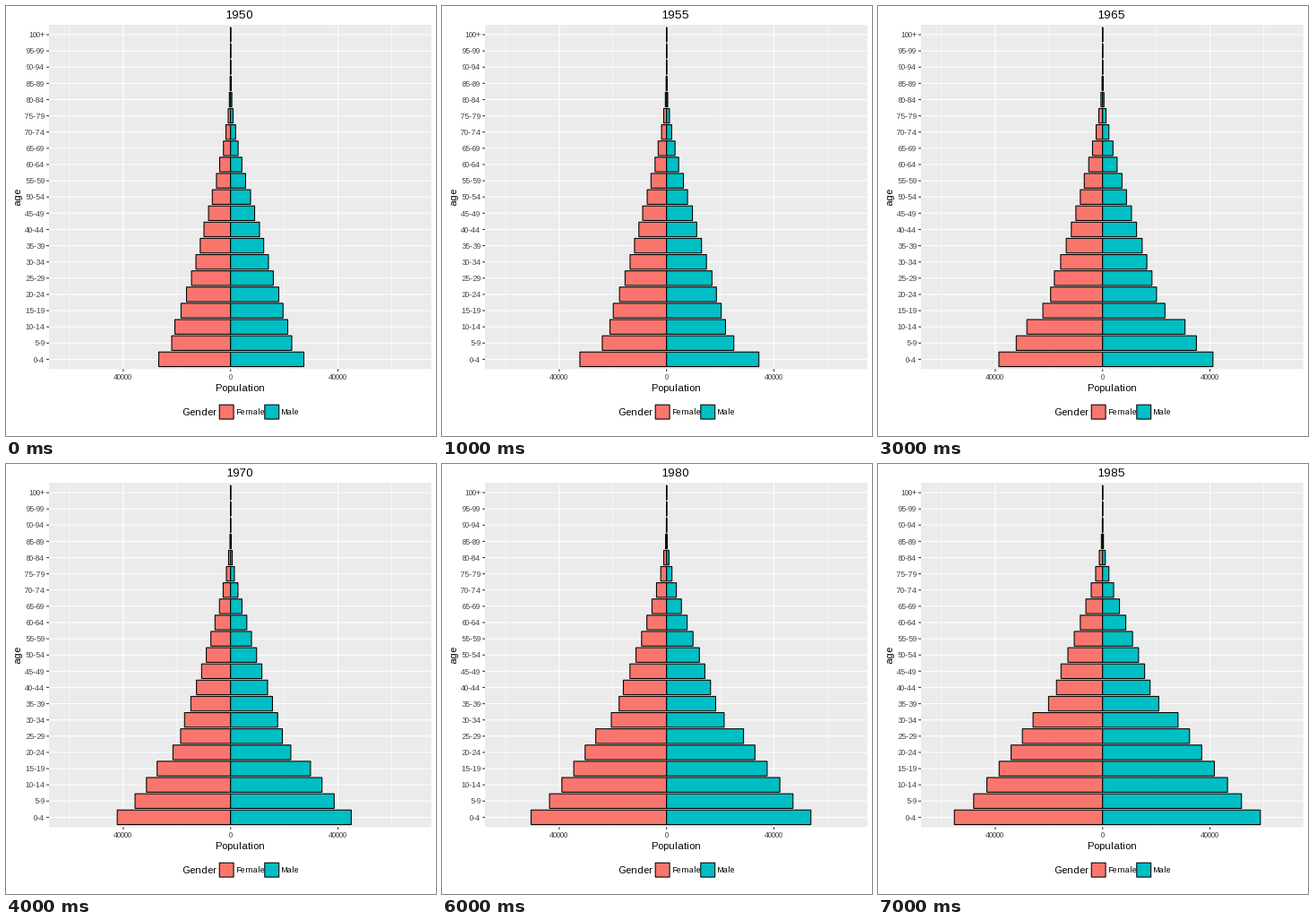
Write a matplotlib script that moves like this. It is 480 px wide and 480 px high and loops after 8000 ms.

```python
import matplotlib.pyplot as plt
import numpy as np
from matplotlib.animation import FuncAnimation
from matplotlib.patches import Rectangle

SIZE, DPI = 480, 96
PT = 72 / DPI  # points per pixel
plt.rcParams["font.family"] = "Liberation Sans"
plt.rcParams["text.hinting_factor"] = 1  # whole-pixel letter spacing
plt.rcParams["path.snap"] = False

LEFT, RIGHT, TOP, BOTTOM = 48, 474.7, 21, 405.3
MIDDLE = (LEFT + RIGHT) / 2
ZERO, STEP = 250.7, 59.9      # x of zero, pixels per 20000 people
FIRST_ROW, ROW = 394.4, 18.12
AGES = np.arange(21)          # five-year age groups
STEPS = 8                     # five-year steps from 1950
PINK, TEAL = "#F8766D", "#00BFC4"

# Bar lengths in pixels for 1950 at a few ages
KEY_AGES = [0, 1, 2, 4, 6, 8, 10, 12, 14, 16, 20]
FEMALE_1950 = [80.2, 65.7, 62.2, 49.2, 38.7, 29.7, 20.4, 12.2, 5.2, 1.4, 0.03]
MALE_1950 = [81.8, 68.3, 63.8, 53.8, 42.3, 32.3, 22.3, 12.6, 5.6, 1.4, 0.03]


def hazard(t, infant, ageing):
    """Death rate per step and age, easing as living conditions improve."""
    hardship = max(0, 1 - t * t / 20) * (0.02 + 0.006 * AGES)
    rate = 0.01 + hardship + ageing * np.exp(0.42 * (AGES - 10))
    rate[0] += infant * (1 - 0.085 * t)
    return rate


def project(start, births, infant, ageing):
    """Move every cohort up one age group per step and add the newborn."""
    people = np.exp(np.interp(AGES, KEY_AGES, np.log(start)))
    history = [people]
    for t in range(STEPS - 1):
        people = np.roll(people * np.exp(-hazard(t, infant, ageing)), 1)
        people[0] = births * 1.0935 ** (t + 1)
        history.append(people)
    return history


females = project(FEMALE_1950, 88.5, infant=0.08, ageing=0.068)
males = project(MALE_1950, 94.2, infant=0.055, ageing=0.08)

fig = plt.figure(figsize=(SIZE / DPI, SIZE / DPI), dpi=DPI, facecolor="white")
ax = fig.add_axes([0, 0, 1, 1])
ax.set_xlim(0, SIZE)
ax.set_ylim(SIZE, 0)
ax.axis("off")


def line(xs, ys, color="white", width=1.07):
    ax.plot(xs, ys, color=color, lw=width * PT, zorder=2,
            solid_capstyle="butt")


def label(x, y, text, size, color="black", **kw):
    return ax.text(x, y, text, fontsize=size * PT, color=color,
                   va="baseline", **kw)


def box(x, y, w, h, fill):
    return ax.add_patch(Rectangle((x, y), w, h, facecolor=fill,
                                  edgecolor="black", lw=1.07 * PT, zorder=5))


ax.add_patch(Rectangle((LEFT, TOP), RIGHT - LEFT, BOTTOM - TOP,
                       facecolor="#EBEBEB", lw=0, zorder=0))

for k in range(-3, 4):
    x = ZERO + k * STEP
    major = k % 2 == 0
    line([x, x], [TOP, BOTTOM], width=1.07 if major else 0.53)
    if major:
        line([x, x], [BOTTOM, BOTTOM + 2.75], "#333333")
        label(x, 416.6, str(abs(k) * 20000), 8.8, "#4D4D4D", ha="center")

bars = []
for i in AGES:
    y = FIRST_ROW - i * ROW
    name = "100+" if i == AGES[-1] else f"{5 * i}-{5 * i + 4}"
    line([LEFT, RIGHT], [y, y])
    line([LEFT - 2.75, LEFT], [y, y], "#333333")
    label(43.1, y + 3.2, name, 8.8, "#4D4D4D", ha="right")
    bars.append([box(ZERO, y - 0.45 * ROW, 0, 0.9 * ROW, fill)
                 for fill in (PINK, TEAL)])

title = label(MIDDLE, 14, "", 13.2, ha="center")
label(MIDDLE, 430, "Population", 11, ha="center")
label(16, 212.6, "age", 11, ha="center", rotation=90, rotation_mode="anchor")

label(196, 457, "Gender", 11)
for x, fill, name in ((238.2, PINK, "Female"), (288.8, TEAL, "Male")):
    box(x, 445.2, 15.9, 15.9, fill)
    label(x + 18.6, 456.5, name, 8.8)


def update(t):
    title.set_text(str(1950 + 5 * t))
    for (female, male), f, m in zip(bars, females[t], males[t]):
        female.set_x(ZERO - f)
        female.set_width(f)
        male.set_width(m)
    return []


anim = FuncAnimation(fig, update, frames=STEPS, interval=1000,
                     init_func=lambda: update(0), repeat=True,
                     repeat_delay=0, blit=False)
plt.show()
```
